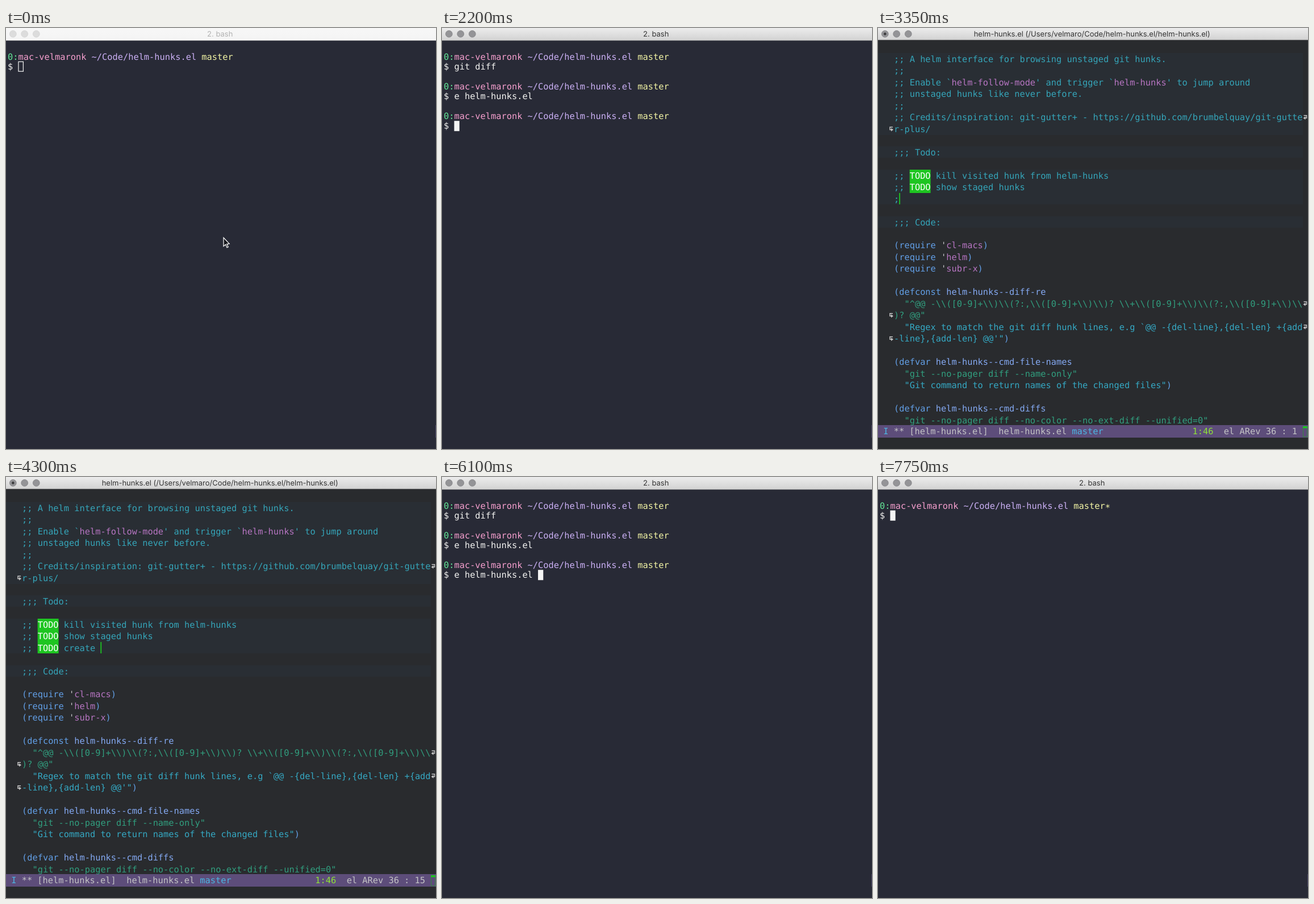
Write an HTML page with a canvas that moves like this. It is 757 by 740 pixels and loops after 8000 ms.

```html
<!DOCTYPE html>
<html lang="en">
<head>
<meta charset="utf-8">
<title>Terminal and editor</title>
<style>
html, body { margin: 0; width: 100%; height: 100%; overflow: hidden; background: #282a36; }
canvas { display: block; width: 100%; height: 100%; }
</style>
</head>
<body>
<canvas id="stage" width="757" height="740"></canvas>
<script type="text/plain" id="buffer">
§c;; A helm interface for browsing unstaged git hunks.
§c;;
§c;; Enable `§phelm-follow-mode§c' and trigger `§phelm-hunks§c' to jump around
§c;; unstaged hunks like never before.
§c;;
§c;; Credits/inspiration: git-gutter+ - https://github.com/brumbelquay/git-gutte↩
§cr-plus/

§c;;; Todo:

§c;; §tTODO§c kill visited hunk from helm-hunks
§c;; §tTODO§c show staged hunks

§c;;; Code:

§k(require §n'§pcl-macs§k)
§k(require §n'§phelm§k)
§k(require §n'§psubr-x§k)

§k(defconst §vhelm-hunks--diff-re
§s  "^@@ -\\([0-9]+\\)\\(?:,\\([0-9]+\\)\\)? \\+\\([0-9]+\\)\\(?:,\\([0-9]+\\)\\↩
§s)? @@"
§d  "Regex to match the git diff hunk lines, e.g `@@ -{del-line},{del-len} +{add↩
§d-line},{add-len} @@'"§k)

§k(defvar §vhelm-hunks--cmd-file-names
§s  "git --no-pager diff --name-only"
§d  "Git command to return names of the changed files"§k)

§k(defvar §vhelm-hunks--cmd-diffs
§s  "git --no-pager diff --no-color --no-ext-diff --unified=0"
§d  "Git command to show minimal diffs"§k)

§k(defvar §vhelm-hunks--cmd-git-root
</script>
<script>
const ctx = document.getElementById('stage').getContext('2d');
const buffer = document.getElementById('buffer').textContent.split('\n');
const LOOP = 8000, WIDTH = 757, HEIGHT = 740, CHAR = 9.225;
const TERM_PITCH = 17.42, EDIT_PITCH = 20.47;
const MONO = '15.33px "DejaVu Sans Mono", monospace';

// Colour keys follow a § in marked-up text.
const colors = {
  g: '#62e797', m: '#f59fce', b: '#cbb0f5', y: '#f3f5a5', a: '#8be9fd', w: '#f4f4f2',
  c: '#35a5b9', d: '#35a9c4', k: '#629fe6', v: '#84a9f2', s: '#319f7f', p: '#b775c2',
  n: '#c3c3c5', t: '#ffffff', l: '#4cb5e2', h: '#8ee236', x: '#292b2e'
};
const GREEN = '#1ec521';

function rect(color, x, y, w, h) {
  ctx.fillStyle = color;
  ctx.fillRect(x, y, w, h);
}

// Fills a run of cells in an editor row, snapped to whole pixels vertically.
function cells(color, x, mid, w) {
  const y = Math.round(mid - EDIT_PITCH / 2);
  rect(color, x, y, w, Math.round(mid + EDIT_PITCH / 2) - y);
}

// Draws marked-up text on the character grid; mid is the middle of the row.
function write(markup, x, mid, key = 'w') {
  ctx.font = MONO;
  ctx.textAlign = 'left';
  let col = 0;
  markup.split('§').forEach((part, i) => {
    if (i) { key = part[0]; part = part.slice(1); }
    if (key === 't') cells(GREEN, x + col * CHAR, mid, part.length * CHAR);
    ctx.fillStyle = colors[key];
    for (const ch of part) ctx.fillText(ch, x + col++ * CHAR, mid + 5.5);
  });
}

const plain = markup => markup.replace(/§./g, '');

function titleBar(title, height, active, modified) {
  const shade = ctx.createLinearGradient(0, 0, 0, height);
  shade.addColorStop(0, active ? '#ececec' : '#f7f7f7');
  shade.addColorStop(1, active ? '#d2d2d2' : '#f4f4f4');
  rect(shade, 0, 0, WIDTH, height);
  rect(active ? '#b4b4b4' : '#d8d8d8', 0, height - 0.7, WIDTH, 0.9);
  for (const x of [12.3, 32.7, 53.3]) {
    ctx.beginPath();
    ctx.arc(x, 10.4, 5.9, 0, 7);
    ctx.fillStyle = active ? '#949497' : '#dcdcdc';
    ctx.fill();
    ctx.strokeStyle = active ? '#828285' : '#d2d2d2';
    ctx.lineWidth = 0.8;
    ctx.stroke();
  }
  if (modified) {
    ctx.beginPath();
    ctx.arc(12.3, 10.4, 2.3, 0, 7);
    ctx.fillStyle = '#3c3c3e';
    ctx.fill();
  }
  ctx.font = '13px Inter, sans-serif';
  ctx.textAlign = 'center';
  ctx.fillStyle = active ? '#343434' : '#b2b2b2';
  ctx.fillText(title, 376.7, 15.3);
}

function pointer() {
  ctx.beginPath();
  [[383, 368.5], [383, 383.6], [386.5, 380.5], [389, 386], [391.2, 385], [388.8, 379.8], [393.2, 379.3]]
    .forEach(([x, y]) => ctx.lineTo(x, y));
  ctx.closePath();
  ctx.fillStyle = '#15161c';
  ctx.fill();
  ctx.strokeStyle = '#fff';
  ctx.lineWidth = 1.2;
  ctx.stroke();
}

const PROMPT = '§g0:§mmac-velmaronk §b~/Code/helm-hunks.el §ymaster';
const DIRTY_PROMPT = PROMPT + '∗';
const OPEN = 'e helm-hunks.el ';
const NEW_LINE = ';; TODO create demo gif';
const DIFF = [
  'diff --git a/helm-hunks.el b/helm-hunks.el',
  'index 4b1d7c2..9e03fa6 100644',
  '--- a/helm-hunks.el',
  '+++ b/helm-hunks.el',
  '§a@@ -33,6 +33,7 @@',
  '',
  ' ;; TODO kill visited hunk from helm-hunks',
  ' ;; TODO show staged hunks',
  '§g+' + NEW_LINE,
  '',
  ' ;;; Code:',
  ''
];

// Number of keys pressed by time t.
const keys = (t, start, step) => Math.max(0, Math.floor((t - start) / step) + 1);

function terminalRows(t) {
  if (t >= 7600) return [DIRTY_PROMPT, '$ '];
  const rows = [PROMPT, '$ ' + 'git diff'.slice(0, keys(t, 600, 50))];
  if (t >= 1150) rows.push('', PROMPT, '$ ' + (t < 1900 ? 'e helm'.slice(0, keys(t, 1550, 60)) : OPEN));
  if (t >= 2100) rows.push('', PROMPT, '$ ' + (t < 6100 ? '' : t < 6350 ? OPEN : 'git diff'));
  if (t >= 6500) rows.push(...DIFF, '', DIRTY_PROMPT, '$ ');
  return rows;
}

function terminal(t) {
  const active = t >= 350;
  rect('#282a36', 0, 0, WIDTH, HEIGHT);
  rect('#4a4565', 756, 698, 1, 22);
  titleBar('2. bash', 22, active);
  const rows = terminalRows(t);
  rows.forEach((row, i) => write(row, 3, 50 + i * TERM_PITCH));
  const last = rows.length - 1;
  const x = 3 + rows[last].length * CHAR, y = 50 + last * TERM_PITCH - 8.7;
  if (active) {
    rect('#f4f4f4', x, y, CHAR, 18);
  } else {
    ctx.strokeStyle = '#f4f4f4';
    ctx.lineWidth = 1.2;
    ctx.strokeRect(x + 0.5, y + 0.5, CHAR - 0.8, 17);
    pointer();
  }
}

// Small hook in the fringe that marks a wrapped line.
function wrapMark(x, mid, side) {
  ctx.strokeStyle = ctx.fillStyle = '#c4c4c4';
  ctx.lineWidth = 1.5;
  ctx.beginPath();
  ctx.moveTo(x - side * 3, mid - 3);
  ctx.lineTo(x + side * 2, mid - 3);
  ctx.lineTo(x + side * 2, mid + 1.5);
  ctx.lineTo(x - side, mid + 1.5);
  ctx.stroke();
  ctx.beginPath();
  ctx.moveTo(x - side * 4, mid + 1.5);
  ctx.lineTo(x, mid - 1.5);
  ctx.lineTo(x, mid + 4.5);
  ctx.fill();
}

function editor(t) {
  const opened = t >= 3150, inserting = opened && t < 4900, modified = opened && t < 5150;
  const top = t < 2750 ? 2 : t < 2800 ? 1 : 0;
  const line = opened ? 36 : 32 + Math.min(3, keys(t, 2900, 70));
  const typed = NEW_LINE.slice(0, keys(t, 3320, 68));
  const col = !opened ? 0 : inserting ? typed.length : typed.length - 1;
  const rows = buffer.slice();
  if (opened) rows.splice(13, 0, typed && '§c' + typed.replace('TODO', '§tTODO§c'));

  rect('#292b2e', 0, 0, WIDTH, HEIGHT);
  const middle = i => 34 + (i - top) * EDIT_PITCH;
  for (let i = top; i < Math.min(rows.length, top + 33); i++) {
    const mid = middle(i), row = rows[i];
    if (row.startsWith('§c')) cells('#292e34', 0, mid, 748);
    write(row.replace('↩', ''), 28, mid, 'n');
    if (row.endsWith('↩')) wrapMark(752.5, mid, 1);
    if (i && rows[i - 1].endsWith('↩')) wrapMark(23, mid, -1);
  }

  const at = line - 23, x = 28 + col * CHAR;
  cells(GREEN, x, middle(at), inserting ? 1.8 : CHAR);
  if (!inserting) write(plain(rows[at])[col] || ' ', x, middle(at), 'x');

  rect('#5d4d7a', 0, 698, WIDTH, 22);
  write(`§l${inserting ? 'I' : 'N'}§n ${modified ? '**' : '--'} [helm-hunks.el]  helm-hunks.el §lmaster`, CHAR, 708.5);
  const status = `§h1:46§n  el ARev ${line} : ${col}`;
  write(status, (80 - plain(status).length) * CHAR, 708.5);
  ctx.strokeStyle = inserting ? '#35883f' : '#81778f';
  ctx.lineWidth = 1;
  ctx.strokeRect(748.5, 701.5, 7, 17);
  rect(inserting ? GREEN : '#f0f0f0', 748, 700, 8, 3.5);

  rect('#292b2e', 0, 720, WIDTH, 20);
  if (t >= 5150) write('Wrote /Users/velmaro/Code/helm-hunks.el/helm-hunks.el', 0, 730, 'n');
  titleBar('helm-hunks.el (/Users/velmaro/Code/helm-hunks.el/helm-hunks.el)', 21, true, modified);
}

function frame() {
  const t = performance.now() % LOOP;
  ctx.textRendering = 'geometricPrecision';
  if (t >= 2250 && t < 5500) editor(t);
  else terminal(t);
  requestAnimationFrame(frame);
}
frame();
</script>
</body>
</html>
```
